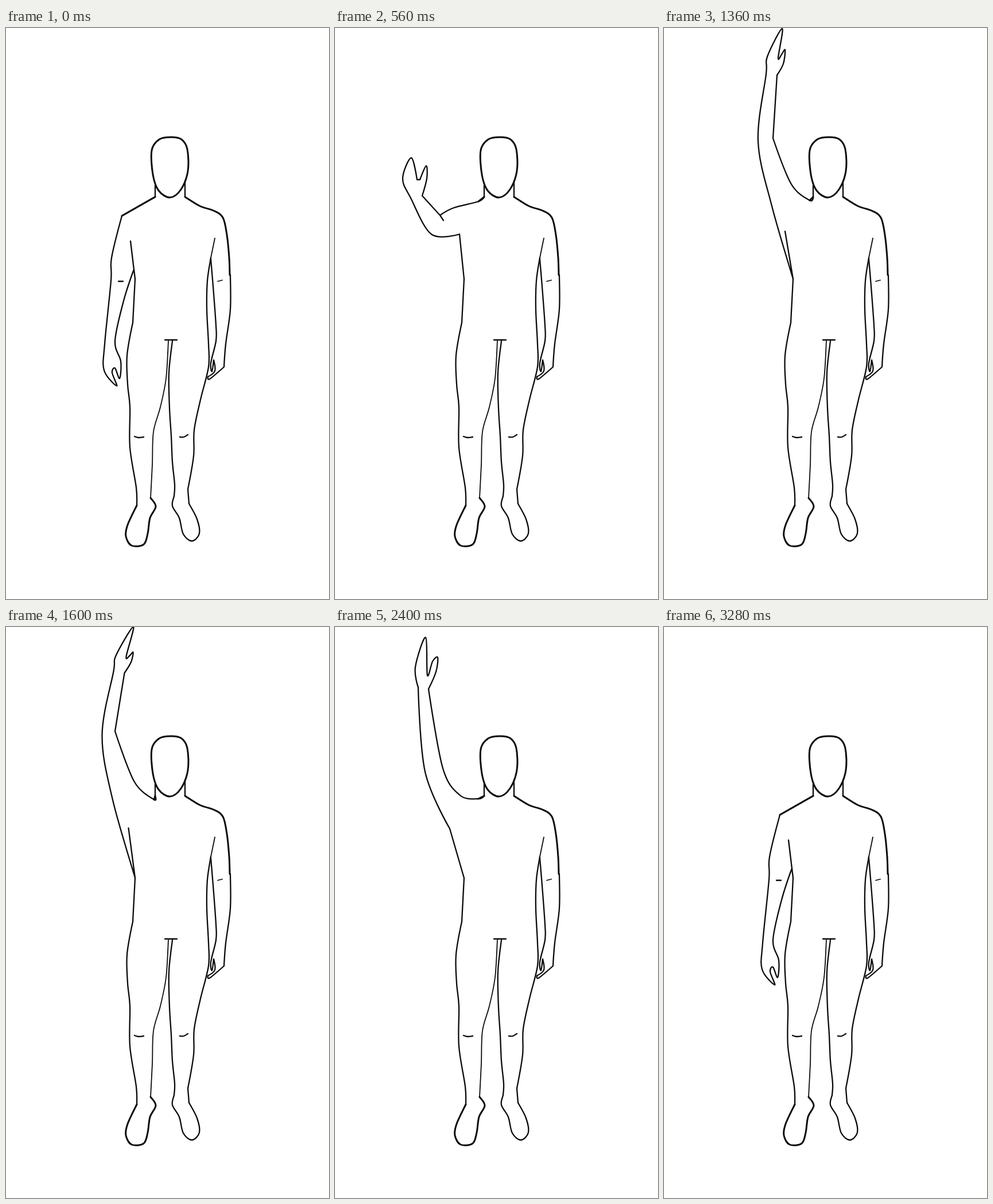
These frames come from a looping animation (563x994 px, 3920 ms). An HTML page:

```html
<!DOCTYPE html>
<html lang="en">
<head>
<meta charset="utf-8">
<title>Raising an arm</title>
<style>
  html, body { margin: 0; width: 100%; height: 100%; overflow: hidden; background: #fff; }
  svg { display: block; width: 100%; height: 100%; }
  path { fill: none; stroke: #0b0b0b; stroke-linecap: round; stroke-linejoin: round; }
</style>
</head>
<body>
<svg viewBox="0 0 563 994"></svg>
<script>
const BOLD = 3, PLAIN = 2.3, FINE = 1.8;
const svg = document.querySelector("svg");

// "x,y" is a smooth point, "x,y*" a corner.
const points = text => text.split(" ").map(word => {
  const [x, y] = word.replace("*", "").split(",").map(Number);
  return { x, y, corner: word.endsWith("*") };
});

const mix = (a, b, k) => a.map((p, i) => ({
  x: p.x + (b[i].x - p.x) * k,
  y: p.y + (b[i].y - p.y) * k,
  corner: p.corner
}));

// Catmull-Rom spline that wraps around when the ends meet.
function spline(list) {
  const last = list.length - 1;
  const closed = list[0].x === list[last].x && list[0].y === list[last].y;
  const slope = i => {
    if (list[i].corner) return { x: 0, y: 0 };
    const before = list[i - 1] || (closed ? list[last - 1] : list[0]);
    const after = list[i + 1] || (closed ? list[1] : list[last]);
    return { x: (after.x - before.x) / 6, y: (after.y - before.y) / 6 };
  };
  let d = `M${list[0].x} ${list[0].y}`;
  for (let i = 0; i < last; i++) {
    const p = list[i], q = list[i + 1], s = slope(i), e = slope(i + 1);
    d += `C${p.x + s.x} ${p.y + s.y} ${q.x - e.x} ${q.y - e.y} ${q.x} ${q.y}`;
  }
  return d;
}

function ink(width, text) {
  const path = document.createElementNS("http://www.w3.org/2000/svg", "path");
  path.setAttribute("stroke-width", width);
  if (text) path.setAttribute("d", spline(points(text)));
  return svg.appendChild(path);
}

// Head and neck
ink(BOLD, "288,190 306,194 316,211 317,249 305,281 286,295 266,283 256,255 254,213 267,194 288,190");
ink(PLAIN, "260,274 260,294");

// Right shoulder, arm and hand
ink(PLAIN, "312,266 312,294");
ink(BOLD, "312,294 338,310 362,318 378,330 385,360 389,400 390,430");
ink(PLAIN, "391,430 391,490 383,550 380,590* 355,611 352,607* 364,597 362,578* 359,598 357,583 366,545 366,518 361,450 357,402");
ink(FINE, "364,366 357,400");
ink(FINE, "369,441 377,439");

// Sides, legs and feet
ink(PLAIN, "357,400 351,440 350,490 353,550 353,590 339,647 328,700 327,745 317,803* 319,828");
ink(PLAIN, "319,828 333,855 337,880 324,893 309,881 302,853 290,832 293,815");
ink(PLAIN, "225,437 221,513* 211,570 212,620 216,660 216,730 227,800 228,831");
ink(BOLD, "228,831 212,865 209,885 219,901 240,899 247,880 251,853 261,833 252,818");
ink(PLAIN, "277,543 298,543");
ink(PLAIN, "290,545 284,600 285,662 288,710 290,755 294,795 293,815");
ink(FINE, "283,545 279,610 269,660 257,703 255,760 252,818");
ink(PLAIN, "224,711 231,713 240,712");
ink(PLAIN, "303,712 310,712 317,708");

// Shoulder, upper arm, elbow, wrist, six around the hand, wrist, elbow,
// armpit, top of the torso line, and sometimes a crease at the elbow.
const rest = points("202,327* 184,400 183,440 172,550 171,596 193,623 185,600 190,592 198,610 200,580 190,545 205,475 223,420* 217,371 196,441 204,441");
const swing = points("202,327* 187,388 162,440 155,483 142,516 156,546 154,519 163,503 169,527 175,510 174,485 197,452 219,380* 218,350 190,404 199,404");
const bend = points("202,325* 190,345 184,372* 164,384* 168,364 159,346 155,360 149,369 136,336 132,372 147,404 172,431 218,374* 217,358");
const hello = points("250,302 207,313 183,326* 152,292* 160,262 159,240 148,264* 143,264* 133,226 118,262 132,296 168,359 217,359* 217,359 183,326 189,335");
const high = points("250,299 218,293 188,246 163,108* 176,78 179,53 170,60 161,84 158,18 140,70 145,105* 157,252 200,351* 200,351");
const higher = points("246,299 219,278 190,213 178,86* 188,64 190,26 184,38 178,53 174,4 157,50 159,86* 157,215 193,332* 206,362");
const upright = points("254,300 222,272 190,192* 197,82* 208,62 211,38 205,46 199,52 206,1 180,50 178,80 164,197 188,310 211,354");

const loosen = mix(rest, swing, 0.5);
const lift = mix(high, hello, 0.5);
const stretch = mix(upright, higher, -0.5);

const LOOP = 3920;
const steps = [
  [0, rest], [320, loosen], [400, swing], [480, bend], [560, hello],
  [720, lift], [880, high], [1040, higher], [1360, upright], [1600, stretch],
  [2080, higher], [2400, high], [2640, lift], [2880, hello],
  [2960, bend], [3120, swing], [3200, loosen], [3280, rest]
];

const [neck, waist] = points("260,294* 225,437");
const arm = ink(PLAIN);
const shoulder = ink(BOLD);
const start = performance.now();
let shown;

function show(pose) {
  const outline = [neck, ...pose.slice(0, 13), waist];
  const crease = pose.slice(14);
  arm.setAttribute("d", spline(outline) + spline([pose[13], waist])
    + (crease.length ? spline(crease) : ""));
  shoulder.setAttribute("d", spline([neck, pose[0]]));
}

function draw(now) {
  const time = Math.max(0, now - start) % LOOP;
  const pose = steps.filter(([at]) => at <= time).pop()[1];
  if (pose !== shown) show(shown = pose);
  requestAnimationFrame(draw);
}
draw(start);
</script>
</body>
</html>
```
